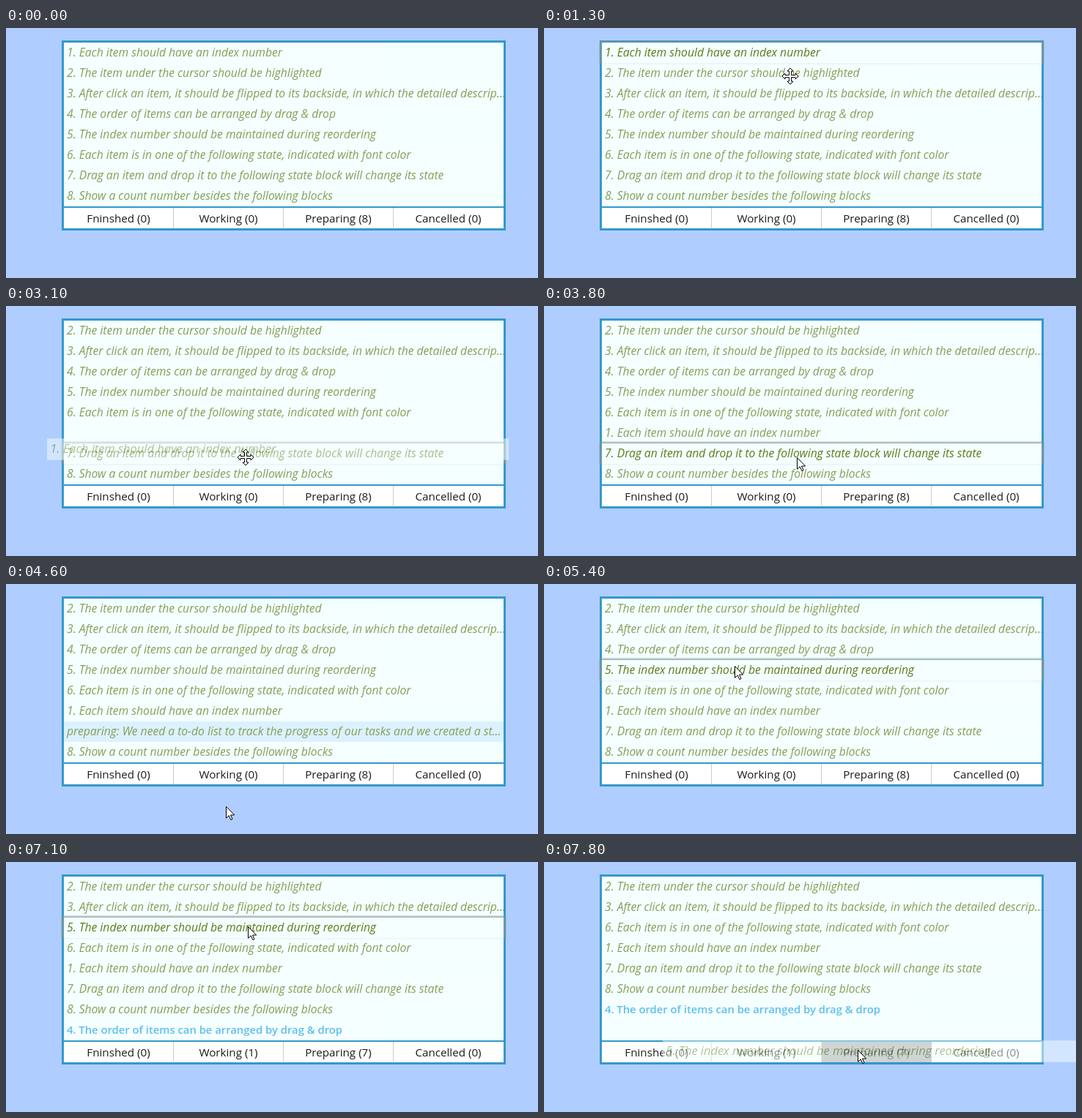
Write an HTML page that moves like this. It is 726 px wide and 342 px high and loops after 8 s.

```html
<!DOCTYPE html>
<html lang="en">
<head>
<meta charset="utf-8">
<title>To-do list</title>
<style>
  html, body { margin: 0; width: 100%; height: 100%; overflow: hidden; background: #b0cdff; }
  svg { display: block; }
  text { font-family: "Open Sans", "Noto Sans", sans-serif; white-space: pre; }
  .item { font-size: 15.7px; font-style: italic; fill: #6e8a34; }
  .hot { fill: #5c7c1c; }
  .working { font-size: 14.8px; font-style: normal; font-weight: 600; fill: #3db2ec; }
  .cell { font-size: 15.2px; fill: #1c1c1c; text-anchor: middle; }
</style>
</head>
<body>
<svg width="726" height="342" viewBox="0 0 726 342">
  <defs>
    <filter id="soft" x="-5%" y="-50%" width="110%" height="200%"><feGaussianBlur stdDeviation=".8"/></filter>
  </defs>
  <rect width="726" height="342" fill="#b0cdff"/>
  <rect x="77.5" y="18.5" width="603" height="257" fill="#f5ffff" stroke="#3399cc" stroke-width="3"/>
  <g id="cells"></g>
  <rect x="79" y="244" width="600" height="2" fill="#3399cc"/>
  <g id="rows"></g>
  <g id="ghost"></g>
  <g id="cursor" stroke="#000" fill="#fff" stroke-linejoin="round">
    <path id="arrow" d="M.5 .5V16.3L4.2 12.8 6.8 18.6 9 17.6 6.5 12H11.7Z"/>
    <path id="move" d="M0-11 4-7H1.5V-1.5H7V-4L11 0 7 4V1.5H1.5V7H4L0 11-4 7H-1.5V1.5H-7V4L-11 0-7-4V-1.5H-1.5V-7H-4Z"/>
  </g>
</svg>
<script>
const LOOP = 8000, STEP = 100, LEFT = 79, TOP = 20, W = 600, H = 28;
const $ = id => document.getElementById(id);

const items = [
  'Each item should have an index number',
  'The item under the cursor should be highlighted',
  'After click an item, it should be flipped to its backside, in which the detailed descrip…',
  'The order of items can be arranged by drag &amp; drop',
  'The index number should be maintained during reordering',
  'Each item is in one of the following state, indicated with font color',
  'Drag an item and drop it to the following state block will change its state',
  'Show a count number besides the following blocks'
];
const backText = 'preparing: We need a to-do list to track the progress of our tasks and we created a st…';
const states = ['Fninshed', 'Working', 'Preparing', 'Cancelled'];

// Pointer path: time, x, y
const path = [
  [200, 350, 100], [600, 342, 72], [900, 336, 38], [1200, 335, 45], [1300, 336, 66],
  [1900, 336, 296], [2200, 336, 296], [2600, 344, 82], [3100, 327, 207], [3300, 346, 206],
  [3500, 345, 207], [4100, 345, 207], [4600, 300, 304], [4800, 302, 313], [5000, 300, 304],
  [5450, 255, 88], [5550, 255, 88], [5800, 273, 152], [6000, 298, 241], [6200, 304, 266],
  [6500, 304, 266], [7100, 330, 88], [7150, 330, 88], [7300, 346, 207], [7800, 428, 257]
];

const drags = [
  { id: 1, press: 1150, from: 1350, to: 3500, x: 335, y: 45 },
  { id: 4, press: 5450, from: 5550, to: 6500, x: 255, y: 88 },
  { id: 5, press: 7100, from: 7150, to: LOOP, x: 330, y: 88 }
];

const clamp = (v, lo, hi) => Math.max(lo, Math.min(hi, v));
const ramp = (t, a, b) => clamp((t - a) / (b - a), 0, 1);

function pointer(t) {
  const n = path.findIndex(p => p[0] > t);
  if (n < 0) return path[path.length - 1].slice(1);
  if (n === 0) return path[0].slice(1);
  const a = path[n - 1], b = path[n], k = ramp(t, a[0], b[0]);
  return [a[1] + (b[1] - a[1]) * k, a[2] + (b[2] - a[2]) * k];
}

// Current order, the dragged item and the pressed item
function layout(t) {
  const order = [1, 2, 3, 4, 5, 6, 7, 8];
  let ghost = null, held = 0;
  for (const d of drags) {
    if (t >= d.press && t < d.from) held = d.id;
    if (t < d.from) break;
    const [px, py] = pointer(Math.min(t, d.to));
    const home = order.indexOf(d.id);
    const dx = px - d.x, y = TOP + H * home + py - d.y;
    const slot = clamp(Math.floor((y + H / 2 - TOP) / H - 0.4), 0, 7);
    order.splice(home, 1);
    order.splice(slot, 0, d.id);
    if (t < d.to) ghost = { id: d.id, dx, y };
  }
  return { order, ghost, held };
}

function face(id, cls, back) {
  const label = back ? backText : id + '. ' + items[id - 1];
  return `<rect x="${LEFT}" width="${W}" height="${H}" fill="${back ? '#d6efff' : '#f5ffff'}"/>` +
    `<text class="item ${cls}" x="${LEFT + 4}" y="19">${label}</text>`;
}

function row(id, y, hot, working, angle) {
  const flip = angle ? ` translate(0 14) scale(1 ${Math.max(0.02, Math.abs(Math.cos(angle)))}) translate(0 -14)` : '';
  const shade = hot ? `<rect x="${LEFT - 3}" y="-2" width="${W + 6}" height="${H + 3}" fill="#7d9896" opacity=".8" filter="url(#soft)"/>` : '';
  const cls = working ? 'working' : hot ? 'hot' : '';
  return `<g transform="translate(0 ${y})${flip}" opacity="${hot ? 1 : 0.82}">` +
    shade + face(id, cls, angle > Math.PI / 2) + '</g>';
}

function cells(px, py, counts) {
  return states.map((name, i) => {
    const x = LEFT + i * 150;
    const over = py >= 246 && py < 274 && px >= x && px < x + 150;
    const edge = i < 3 ? `<path d="M${x + 149.5} 246V274" stroke="#999" stroke-dasharray="1 1"/>` : '';
    return `<rect x="${x}" y="246" width="150" height="28" fill="${over ? '#a9a9a9' : '#fff'}"/>${edge}` +
      `<text class="cell" x="${x + 74.5}" y="266">${name} (${counts[i]})</text>`;
  }).join('');
}

function draw(t) {
  const shown = t >= 200;
  const [px, py] = shown ? pointer(t) : [-99, -99];
  const { order, ghost, held } = layout(t);
  const dropped = t >= 6500;
  const angle = Math.PI * (ramp(t, 4100, 4500) - ramp(t, 5000, 5400));
  const slot = Math.floor((py - TOP) / H);

  $('cells').innerHTML = cells(px, py, dropped ? [0, 1, 7, 0] : [0, 0, 8, 0]);
  $('rows').innerHTML = order.map((id, i) => {
    if (ghost && ghost.id === id) return '';
    const hot = held ? id === held : i === slot;
    return row(id, TOP + i * H, hot, dropped && id === 4, id === 7 ? angle : 0);
  }).join('');

  // The dragged copy grows by 5% about its centre
  const cx = LEFT + W / 2;
  $('ghost').innerHTML = ghost
    ? `<g opacity=".5" transform="translate(${cx + ghost.dx} ${ghost.y + 14}) scale(1.05) translate(${-cx} -14)">${face(ghost.id, '', false)}</g>`
    : '';

  const moving = t < 3500;
  $('cursor').setAttribute('transform', `translate(${Math.round(px)} ${Math.round(py)})`);
  $('cursor').setAttribute('visibility', shown ? 'visible' : 'hidden');
  $('move').style.display = moving ? '' : 'none';
  $('arrow').style.display = moving ? 'none' : '';
}

const start = performance.now();
let last = -1;
function tick() {
  const t = Math.floor(((performance.now() - start) % LOOP) / STEP) * STEP;
  if (t !== last) draw(last = t);
  requestAnimationFrame(tick);
}
tick();
</script>
</body>
</html>
```
